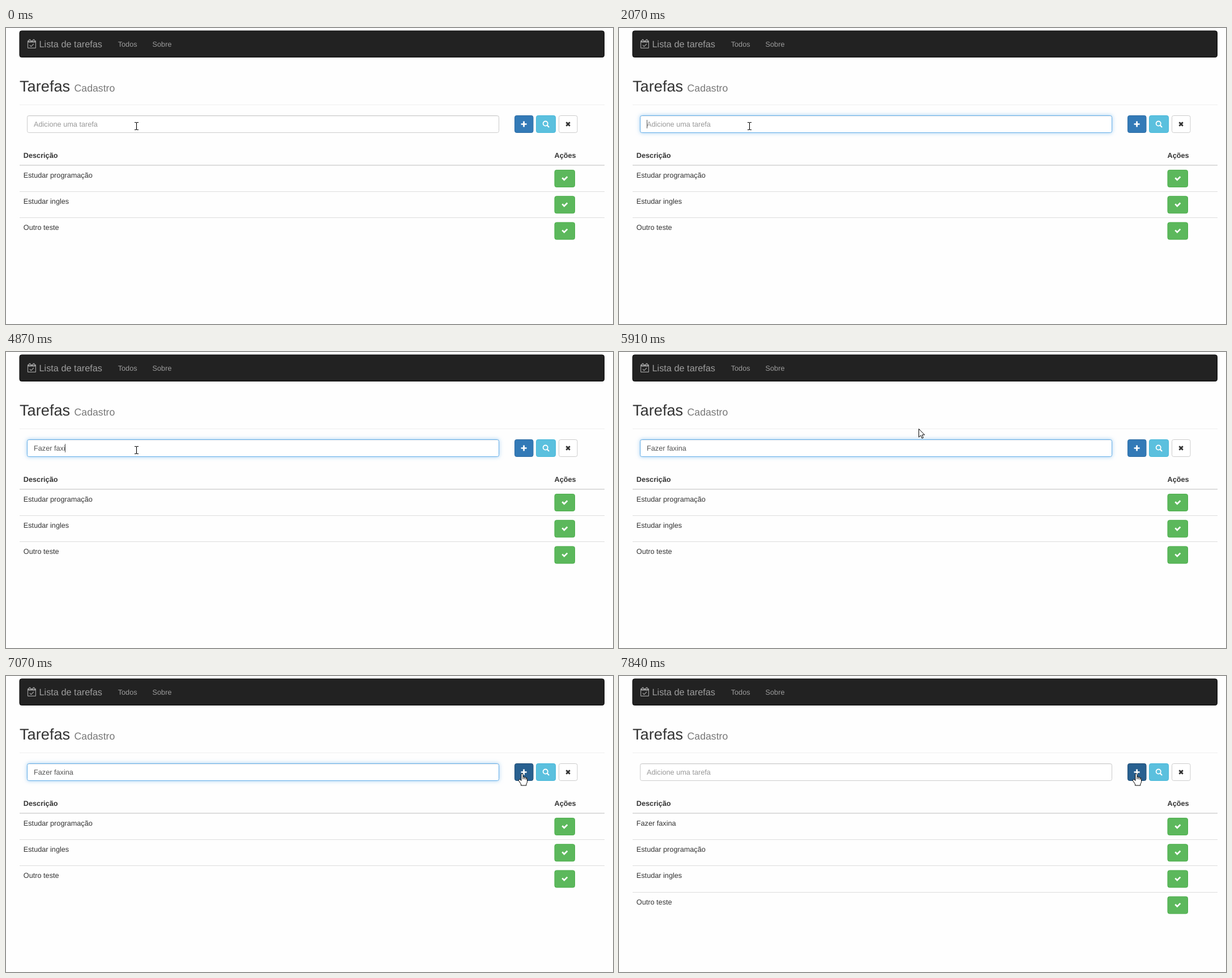
Write an HTML page that moves like this. It is 1072 px wide and 522 px high and loops after 8000 ms.

```html
<!DOCTYPE html>
<html lang="pt">
<head>
<meta charset="utf-8">
<title>Lista de tarefas</title>
<style>
  html, body { margin: 0; width: 100%; height: 100%; overflow: hidden; background: #fefefe; }
  #field {
    position: absolute; left: 37px; top: 154px; width: 834px; height: 31px;
    box-sizing: border-box; border: 1px solid #ccc; border-radius: 3.6px; background: #fff;
  }
  svg { position: absolute; left: 0; top: 0; display: block; }
  text {
    font: 12.69px "Liberation Sans", Arial, sans-serif;
    fill: #333; text-rendering: geometricPrecision; white-space: pre;
  }
  .nav { fill: #9d9d9d; }
  .bold { font-weight: bold; }
</style>
</head>
<body>
<div id="field"></div>
<svg width="1072" height="522" viewBox="0 0 1072 522">
  <defs>
    <path id="check" d="M-4.54,-1.28L-.98,2.28L4.54,-3.24" fill="none" stroke="#fff" stroke-width="2.7"/>
  </defs>

  <rect x="24" y="5" width="1032.5" height="46.5" rx="3.6" fill="#222" stroke="#080808"/>
  <g transform="translate(37.9 19.7)" fill="#9d9d9d">
    <path fill-rule="evenodd" d="M1.2,2.3H13.9Q15.1,2.3 15.1,3.5V15.1Q15.1,16.3 13.9,16.3H1.2Q0,16.3 0,15.1V3.5Q0,2.3 1.2,2.3ZM1.2,5.8V15.1H13.9V5.8Z"/>
    <rect x="2.3" width="3.5" height="5.6" rx="1.4"/>
    <rect x="9.3" width="3.5" height="5.6" rx="1.4"/>
    <path d="M4.1,1.2V4.4M11.05,1.2V4.4" stroke="#222" stroke-width="1.16"/>
    <path d="M4.1,10.6L6.4,12.9L11,8.3" fill="none" stroke="#9d9d9d" stroke-width="1.25"/>
  </g>
  <text class="nav" x="58.5" y="34" style="font-size:16.31px">Lista de tarefas</text>
  <text class="nav" x="197.7" y="33">Todos</text>
  <text class="nav" x="258.6" y="33">Sobre</text>

  <text x="24" y="112" style="font-size:27.19px">Tarefas</text>
  <text x="120.6" y="112" style="font-size:17.67px;fill:#777">Cadastro</text>
  <rect x="24" y="135" width="1033" height="1" fill="#eee"/>

  <text id="value" x="49" y="174"></text>
  <rect id="caret" y="162" width="1" height="15" fill="#555"/>

  <g transform="translate(914.6 169.5)">
    <rect id="add" x="-16.1" y="-15" width="32.5" height="30" rx="3.2"/>
    <path d="M-5,0H5M0,-5V5" stroke="#fff" stroke-width="2.7"/>
  </g>
  <g transform="translate(953.6 169.5)">
    <rect x="-17.1" y="-15" width="34" height="30" rx="3.2" fill="#5bc0de" stroke="#46b8da"/>
    <circle cx="-.9" cy="-.9" r="4.08" fill="none" stroke="#fff" stroke-width="1.8"/>
    <path d="M2.3,2.3L4.9,4.9" stroke="#fff" stroke-width="2.1" stroke-linecap="round"/>
  </g>
  <g transform="translate(992.6 169.5)">
    <rect x="-16.1" y="-15" width="32.5" height="30" rx="3.2" fill="#fff" stroke="#ccc"/>
    <path d="M-3.2,-3.2L3.2,3.2M3.2,-3.2L-3.2,3.2" stroke="#333" stroke-width="2.8"/>
  </g>

  <text class="bold" x="30.8" y="229">Descrição</text>
  <text class="bold" x="968.5" y="229">Ações</text>
  <rect x="24" y="241" width="1033" height="2" fill="#ddd"/>
  <g id="rows"></g>

  <g id="beam" fill="none" stroke="#000" stroke-width="1.1">
    <path d="M-3,-6.5H-.9L.5,-5.8L1.9,-6.5H4M.5,-6V6M-3,6.5H-.9L.5,5.8L1.9,6.5H4"/>
  </g>
  <path id="arrow" d="M.5,.6V15.2L3.9,12L6.1,17.2L8.4,16.2L6.2,11.1H10.7Z" fill="#fff" stroke="#000"/>
  <g id="hand" fill="#fff" stroke="#000" stroke-linejoin="round">
    <path d="M-1.6,1.6Q-1.6,.1 0,.1Q1.6,.1 1.6,1.6V6.2Q2.9,5.3 4.4,6.7Q6,6 7,7.7Q9,7.3 9,9.6V14.5Q8.8,16.6 7.4,18.4V21H-2V18.6L-5.6,13.2Q-6.6,11.4 -5.3,10.5Q-4,9.9 -2.8,11.2L-1.6,12.5Z"/>
    <path d="M1.6,6.2V10M4.4,6.8V10.3M7,7.8V10.8" fill="none"/>
  </g>
</svg>
<script>
const LOOP = 8000, SUBMIT = 7840;
const $ = id => document.getElementById(id);
const TASKS = ['Estudar programação', 'Estudar ingles', 'Outro teste'];

// [time, typed text, caret x]
const typing = [
  [0, '', 49], [2780, 'Fa', 63], [3050, 'Faz', 70], [3800, 'Faze', 77],
  [4060, 'Fazer', 81], [4190, 'Fazer ', 84.6], [4570, 'Fazer fa', 95],
  [4870, 'Fazer faxi', 104], [5000, 'Fazer faxin', 111], [5130, 'Fazer faxina', 119],
  [SUBMIT, '', 49]
];

// times at which the caret turns on and off in turn
const blinks = [120, 490, 1060, 1560, 2070, 3550, 3800, 5630, 6180, 6680, 7190, SUBMIT];

// [time, pointer shape, x, y]
const pointer = [
  [0, 'beam', 230, 173], [5910, 'arrow', 529, 135], [6050, 'arrow', 640, 130],
  [6180, 'arrow', 726, 137], [6300, 'arrow', 781, 144], [6440, 'arrow', 836, 151],
  [6560, 'arrow', 876, 159], [6680, 'arrow', 889, 165], [6800, 'arrow', 895, 169],
  [6920, 'arrow', 898, 171], [7070, 'hand', 911.5, 172], [7190, 'hand', 913.5, 172]
];

// [time, fill, border]
const addLook = [
  [0, '#337ab7', '#2e6da4'], [7070, '#286090', '#204d74'],
  [7440, '#204d74', '#122b40'], [7570, '#286090', '#204d74']
];

// [time, border blend, glow strength]
const focus = [[0, 0, 0], [120, .35, 0], [370, 1, .95], [490, 1, 1], [SUBMIT, 0, 0]];

const at = (keys, t) => keys.findLast(k => k[0] <= t);
const mix = (a, b, p) => Math.round(a + (b - a) * p);

function rowMarkup(name, i) {
  const line = i ? `<rect x="24" y="${242 + 46 * i + (i > 2)}" width="1033" height="1" fill="#ddd"/>` : '';
  const y = 46.2 * i;
  return `${line}<text x="30.8" y="${Math.round(263.9 + y)}">${name}</text>
    <g transform="translate(986.8 ${265.5 + y})">
      <rect x="-17.8" y="-15" width="35.5" height="30" rx="3.2" fill="#5cb85c" stroke="#4cae4c"/>
      <use href="#check"/>
    </g>`;
}

let shown = -1;
function drawRows(added) {
  if (shown === added) return;
  shown = added;
  const list = added ? ['Fazer faxina', ...TASKS] : TASKS;
  $('rows').innerHTML = list.map(rowMarkup).join('');
}

function drawField(t) {
  const [, border, glow] = at(focus, t);
  const style = $('field').style;
  style.borderColor = `rgb(${mix(204, 102, border)},${mix(204, 175, border)},${mix(204, 233, border)})`;
  style.boxShadow = `inset 0 1px 1px rgba(0,0,0,.075), 0 0 7.25px rgba(102,175,233,${.6 * glow})`;

  const [, text, x] = at(typing, t);
  $('value').textContent = text || 'Adicione uma tarefa';
  $('value').style.fill = text ? '#555' : '#999';
  $('caret').setAttribute('x', Math.floor(x));
  const lit = blinks.filter(b => b <= t).length % 2;
  $('caret').setAttribute('visibility', lit ? 'visible' : 'hidden');
}

function drawPointer(t) {
  const [, shape, x, y] = at(pointer, t);
  for (const id of ['beam', 'arrow', 'hand']) {
    $(id).setAttribute('visibility', id === shape ? 'visible' : 'hidden');
  }
  $(shape).setAttribute('transform', `translate(${x} ${y})`);
  const [, fill, border] = at(addLook, t);
  $('add').setAttribute('fill', fill);
  $('add').setAttribute('stroke', border);
}

function draw(t) {
  drawRows(t >= SUBMIT);
  drawField(t);
  drawPointer(t);
}

const start = performance.now();
function tick() {
  draw((performance.now() - start) % LOOP);
  requestAnimationFrame(tick);
}
draw(0);
requestAnimationFrame(tick);
</script>
</body>
</html>
```
